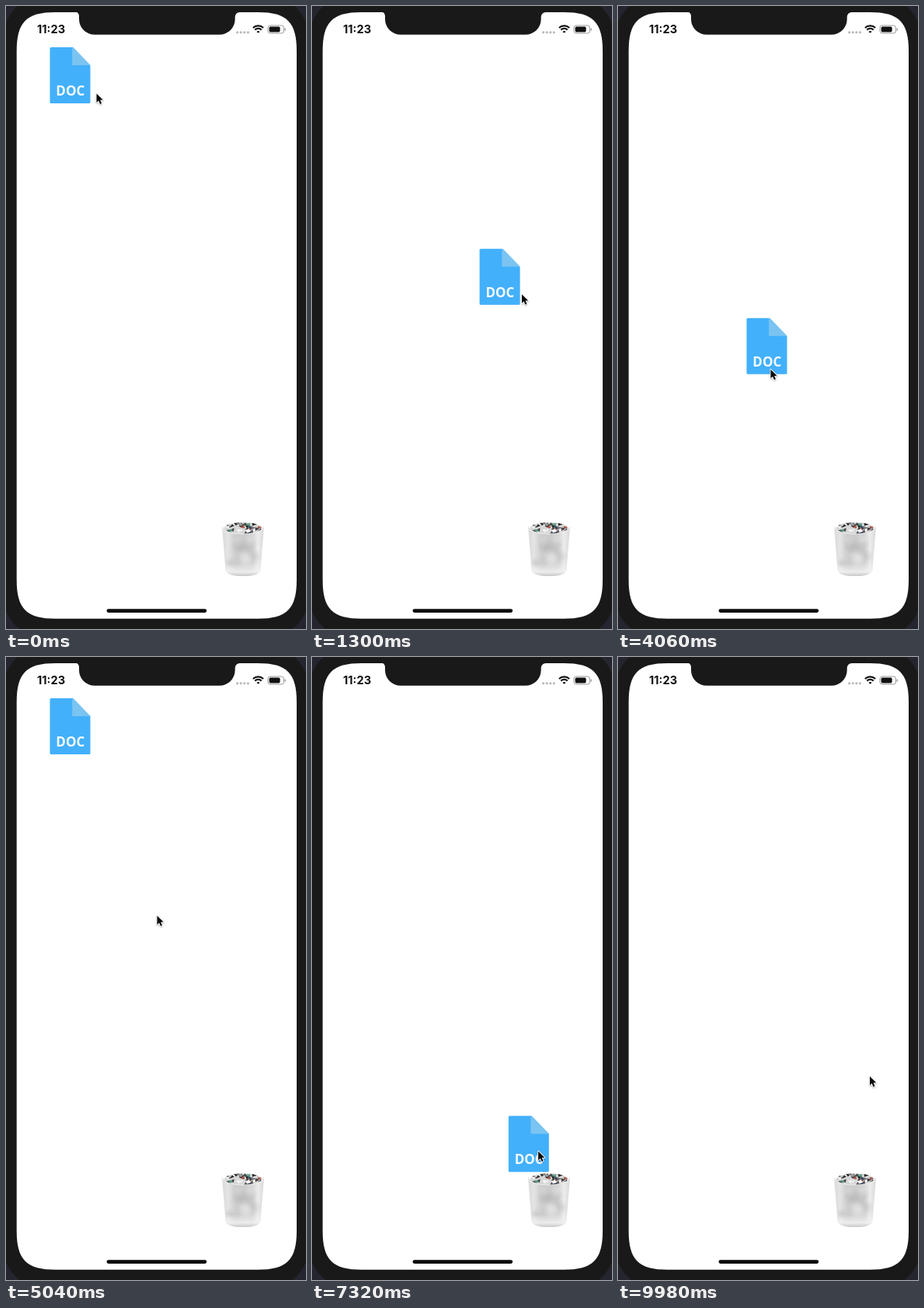
Animation, 386 px wide and 800 px high, one loop 10 s. Source, as an HTML page with a canvas:

```html
<!DOCTYPE html>
<html lang="en">
<head>
<meta charset="utf-8">
<title>Drag to trash</title>
<style>
  html, body { margin: 0; width: 100%; height: 100%; overflow: hidden; background: #191919; }
  canvas { display: block; width: 386px; height: 800px; }
</style>
</head>
<body>
<canvas id="stage" width="386" height="800"></canvas>
<script>
const W = 386, H = 800, LOOP = 10000;
const LAG = 30;                       // the document trails the pointer
const HOME = [56.5, 53], POINTER = [116, 112];
const FADE = [8180, 8510];
const ctx = document.getElementById('stage').getContext('2d');

// A move is [start, end, x, y, bend]. Each drag: the pointer wanders (via),
// reaches the document, drags it along legs, and it may spring back home.
const drags = [
  { via: [], reach: [20, 220], grab: [50, 51.5],
    legs: [[250, 1580, 236, 345], [1720, 2220, 159, 552]], back: [2240, 2530] },
  { via: [[2840, 3080, 88, 249]], reach: [3240, 3740], grab: [7, 15],
    legs: [[3789, 4250, 271, 602, -29]], back: [4250, 4530] },
  { via: [[4760, 5280, 128, 108]], reach: [5460, 5990], grab: [37, 39],
    legs: [[6043, 6540, 224, 368, 12], [6820, 7388, 254, 598], [7450, 8020, 276, 656]] }
];
const docMoves = [], pointerMoves = [];
for (const { via, reach, grab: [gx, gy], legs, back } of drags) {
  pointerMoves.push(...via, [...reach, HOME[0] + gx, HOME[1] + gy]);
  for (const [a, b, x, y, bend] of legs) {
    docMoves.push([a, b, x, y, bend]);
    pointerMoves.push([a - LAG, b - LAG, x + gx, y + gy, bend]);
  }
  if (back) docMoves.push([...back, ...HOME]);
}
pointerMoves.push([9300, 9980, 323.5, 538]);

function ease(t, a, b) {
  const u = Math.min(1, Math.max(0, (t - a) / (b - a)));
  return u * u * (3 - 2 * u);
}

function follow(moves, [x, y], t) {
  for (const [a, b, toX, toY, bend = 0] of moves) {
    if (t < a) break;
    const s = ease(t, a, b);
    x += (toX - x) * s + 4 * bend * s * (1 - s);
    y += (toY - y) * s;
  }
  return [x, y];
}

function seeded(seed) {
  return () => (seed = seed * 16807 % 2147483647) / 2147483647;
}

function box(x, y, w, h, r, fill) {
  ctx.beginPath();
  ctx.roundRect(x, y, w, h, r);
  ctx.fillStyle = fill;
  ctx.fill();
}

function poly(points, fill) {
  ctx.beginPath();
  for (const p of points) ctx.lineTo(...p);
  ctx.closePath();
  ctx.fillStyle = fill;
  ctx.fill();
}

// Rectangle whose corners ease into the sides
function softBox(l, t, r, b, reach, pull) {
  ctx.beginPath();
  for (const [x, y, dx, dy] of [[l, t, 1, 1], [r, t, -1, 1], [r, b, -1, -1], [l, b, 1, -1]]) {
    const side = k => [x, y + dy * k], flat = k => [x + dx * k, y];
    const [from, to] = dx === dy ? [side, flat] : [flat, side];
    ctx.lineTo(...from(reach));
    ctx.bezierCurveTo(...from(pull), ...to(pull), ...to(reach));
  }
  ctx.closePath();
}

function phone() {
  ctx.fillStyle = '#24252e';
  ctx.fillRect(0, 0, W, H);
  box(-4, -14, 394, 826, 56, '#191919');
  softBox(13.7, 8, 374, 786.7, 50, 12.6);
  ctx.fillStyle = '#fff';
  ctx.fill();

  ctx.beginPath();
  ctx.moveTo(88, 7);
  ctx.arcTo(94, 8, 94, 17, 6);
  ctx.arcTo(94, 36.8, 194, 36.8, 20);
  ctx.arcTo(294.7, 36.8, 294.7, 17, 20);
  ctx.arcTo(294.7, 8, 301, 8, 6);
  ctx.lineTo(301, 7);
  ctx.closePath();
  ctx.fillStyle = '#191919';
  ctx.fill();

  box(129.5, 774.2, 128.7, 4.7, 2.4, '#0a0a0a');
}

function statusBar() {
  ctx.fillStyle = '#111';
  ctx.font = '700 14.6px Inter, sans-serif';
  ctx.textAlign = 'left';
  ctx.fillText('11:23', 40, 35);

  for (let i = 0; i < 4; i++) box(296 + i * 4.6, 32.2, 3.2, 3.2, 1.6, '#b9b9b9');

  const up = -Math.PI / 2, half = 0.76;
  ctx.strokeStyle = '#111';
  ctx.lineWidth = 2.2;
  for (const r of [9.6, 6.1, 1.8]) {
    ctx.beginPath();
    ctx.arc(324.5, 35, r, up - half, up + half);
    ctx.stroke();
  }

  ctx.beginPath();
  ctx.roundRect(337, 25, 20.5, 10, 3);
  ctx.strokeStyle = '#999';
  ctx.lineWidth = 1;
  ctx.stroke();
  box(338.6, 26.6, 14, 6.8, 1.6, '#111');
  box(358.6, 28.4, 1.4, 3.4, 0.7, '#999');
}

function scraps() {
  const rnd = seeded(23);
  const tones = ['#2a2a2a', '#f6f6f6', '#444', '#d8d8d8', '#33405f', '#fafafa', '#777',
    '#5d9b86', '#2d2826', '#eee', '#a9574a', '#555'];
  ctx.save();
  ctx.beginPath();
  ctx.ellipse(305, 671, 24.5, 8, 0, 0, 7);
  ctx.fillStyle = '#d6d6d6';
  ctx.fill();
  ctx.clip();
  for (let i = 0; i < 48; i++) {
    const x = 283 + rnd() * 44, y = 664 + rnd() * 13, turn = rnd() * 6;
    const corner = k => [x + 3.6 * Math.cos(turn + k), y + 2.8 * Math.sin(turn + k)];
    poly([corner(0), corner(1.6 + rnd()), corner(3.8)], tones[i % tones.length]);
  }
  ctx.restore();
}

function trash() {
  scraps();
  const side = ctx.createLinearGradient(278, 0, 332, 0);
  ['#dadada', '#e4e4e4', '#cfcfcf', '#cbcbcb', '#cdcdcd', '#d3d3d3', '#ececec', '#d8d8d8']
    .forEach((tone, i, all) => side.addColorStop(i / (all.length - 1), tone));
  ctx.beginPath();
  ctx.moveTo(278, 668);
  ctx.quadraticCurveTo(282, 677, 305, 678.5);
  ctx.quadraticCurveTo(328, 677, 332, 668);
  ctx.lineTo(327.5, 724);
  ctx.quadraticCurveTo(326, 732, 305, 732);
  ctx.quadraticCurveTo(284, 732, 282.5, 724);
  ctx.closePath();
  ctx.fillStyle = side;
  ctx.fill();

  // Soft folds and the pale base
  ctx.save();
  ctx.clip();
  const rnd = seeded(7);
  for (let i = 0; i < 14; i++) {
    const x = 288 + rnd() * 34, y = 682 + rnd() * 36, r = 6 + rnd() * 6;
    const tone = i % 2 ? '232,232,232' : '180,180,180';
    const g = ctx.createRadialGradient(x, y, 0, x, y, r);
    g.addColorStop(0, `rgba(${tone},.45)`);
    g.addColorStop(1, `rgba(${tone},0)`);
    ctx.fillStyle = g;
    ctx.fillRect(x - r, y - r, 2 * r, 2 * r);
  }
  const base = ctx.createLinearGradient(0, 716, 0, 732);
  base.addColorStop(0, 'rgba(242,242,242,0)');
  base.addColorStop(0.65, 'rgba(242,242,242,.85)');
  base.addColorStop(1, '#c8c8c8');
  ctx.fillStyle = base;
  ctx.fillRect(278, 716, 54, 16);
  ctx.restore();

  ctx.beginPath();
  ctx.ellipse(305, 670, 26.5, 8, 0, 0.15, Math.PI - 0.15);
  ctx.strokeStyle = '#ededed';
  ctx.lineWidth = 1;
  ctx.stroke();
}

function doc(x, y, alpha) {
  ctx.save();
  ctx.globalAlpha = alpha;
  ctx.translate(x, y);
  box(0, 0, 52, 72, 1.5, '#43b0fb');
  poly([[28.7, -1], [53, -1], [53, 24]], '#fff');
  poly([[28.7, 0], [52, 23], [28.7, 23]], '#7bc4f1');
  ctx.fillStyle = '#f5fbff';
  ctx.font = '700 17px "Open Sans", "Noto Sans", sans-serif';
  ctx.textAlign = 'center';
  ctx.fillText('DOC', 26.3, 62);
  ctx.restore();
}

function pointer(x, y) {
  ctx.save();
  ctx.translate(x + 0.5, y + 0.5);
  ctx.scale(0.88, 0.88);
  ctx.beginPath();
  for (const p of [[0, 0], [0, 13], [3, 10.3], [5.2, 15.2], [7.4, 14.2], [5.3, 9.4], [9.3, 9.2]])
    ctx.lineTo(...p);
  ctx.closePath();
  ctx.shadowColor = 'rgba(0,0,0,.3)';
  ctx.shadowBlur = 2;
  ctx.shadowOffsetY = 1;
  ctx.strokeStyle = '#fff';
  ctx.lineWidth = 2;
  ctx.lineJoin = 'round';
  ctx.stroke();
  ctx.shadowColor = 'transparent';
  ctx.fillStyle = '#0a0a0a';
  ctx.fill();
  ctx.restore();
}

function draw(t) {
  phone();
  statusBar();
  trash();
  const alpha = 1 - ease(t, ...FADE);
  if (alpha > 0) doc(...follow(docMoves, HOME, t), alpha);
  pointer(...follow(pointerMoves, POINTER, t));
}

const start = performance.now();
function tick() {
  draw((performance.now() - start) % LOOP);
  requestAnimationFrame(tick);
}
tick();
</script>
</body>
</html>
```
